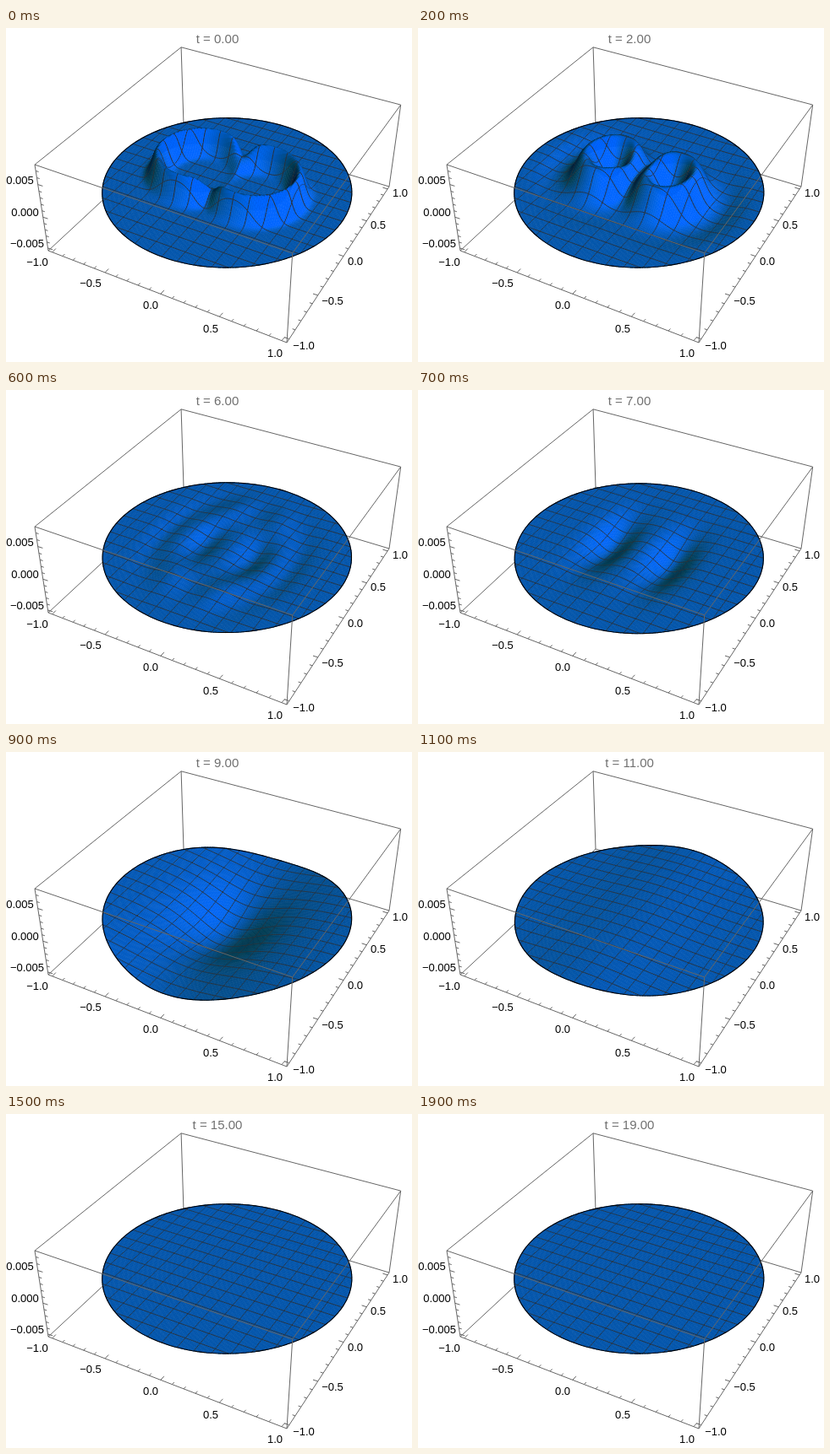
An HTML page with a canvas for the animation above (2 s loop, 480 px wide and 396 px high).

```html
<!DOCTYPE html>
<html lang="en">
<head>
<meta charset="utf-8">
<title>Wave on a disk</title>
<style>
  html, body { margin: 0; width: 100%; height: 100%; overflow: hidden; background: #fff; }
  svg, canvas { position: absolute; left: 0; top: 0; width: 480px; height: 396px; }
  text { font: 13px "Liberation Sans", Arial, sans-serif; text-anchor: middle; }
  #title { font-size: 15px; fill: #707070; }
  path { fill: none; stroke: #666; stroke-width: 1; }
</style>
</head>
<body>
<svg viewBox="0 0 480 396"><path id="back"/></svg>
<canvas id="surface" width="480" height="396"></canvas>
<svg viewBox="0 0 480 396">
  <path id="front"/>
  <path id="ticks"/>
  <g id="labels"></g>
  <text id="title" x="250" y="18"></text>
</svg>
<script>
const $ = id => document.getElementById(id);
const ctx = $('surface').getContext('2d');
const STEPS = 20, STEP_MS = 100;
const N = 128, MESH = 8, H = 2 / N;
const PAD = 1.04, Z0 = 0.407, ZC = 75, STEEP = 62.4;

// Perspective view of the box; a, b, c run from 0 to 1 along its edges.
function project(a, b, c) {
  const w = 1 - 0.1097 * a + 0.2152 * b - 0.072 * c;
  return [
    (50 + 245.58 * a + 205.19 * b - 18.45 * c) / w,
    (264 + 68.08 * a - 124.25 * b - 113.66 * c) / w
  ];
}
const unit = v => 0.5 + v / (2 * PAD);
const place = (x, y, z) => project(unit(x), unit(y), Z0 + ZC * z);

const bell = (v, s) => Math.exp(-v * v / (s * s));

// Two joined rings that close in on their centres.
function rings(x, y, t) {
  const ax = Math.hypot(x, 0.02 + 0.02 * t);
  const s = Math.hypot(ax - 0.25 - 0.01 * t, y * (1 - 0.1 * t));
  const r = 0.345 * (1 - t / 4.6);
  const waist = 1 - 0.5 * bell(x, 0.08);
  return 0.0038 * waist * bell(s - r, 0.065 + 0.015 * t)
    - 0.0003 * t * bell(s - r - 0.26, 0.12) * bell(y, 0.6);
}

// Two facing crescents, each with a trough on its outer side.
function crescents(x, y) {
  const q = Math.hypot(x, 0.6 * y);
  const side = 1 - bell(x, 0.2);
  return side * (0.0036 * bell(q - 0.32, 0.13) - 0.0015 * bell(q - 0.56, 0.1) * bell(y, 0.6));
}

const twinTroughs = (x, y) => -0.0006
  - 0.0019 * (bell(x - 0.27, 0.15) + bell(x + 0.27, 0.15)) * bell(y, 0.38);

const valley = (x, y) => -0.0029 * bell(x, 0.33) * bell(y, 0.5) - 0.0019 * bell(x, 0.65);

// Shapes after the rings, blended from one to the next.
const stages = [
  [3, (x, y) => rings(x, y, 3)],
  [4, crescents],
  [7, twinTroughs],
  [9, valley],
  [11, x => -0.0009 + 0.0007 * bell(x, 0.5)],
  [14.5, () => 0]
];

function shapeAt(t) {
  if (t < stages[0][0]) return (x, y) => rings(x, y, t);
  const i = stages.findIndex(s => t < s[0]);
  if (i < 0) return () => 0;
  const [t0, f] = stages[i - 1], [t1, g] = stages[i];
  const k = (t - t0) / (t1 - t0), m = k * k * (3 - 2 * k);
  return (x, y) => (1 - m) * f(x, y) + m * g(x, y);
}

// Colour from the slope, lit from the viewer's right.
function shade(gx, gy) {
  const len = Math.hypot(gx, gy, 1);
  const nx = -gx / len, ny = -gy / len, nz = 1 / len;
  const right = 0.879 * nx + 0.476 * ny;
  const up = -0.281 * nx + 0.519 * ny + 0.807 * nz;
  const toward = 0.384 * nx - 0.709 * ny + 0.591 * nz;
  const d = 0.5 * right - 0.1 * up + 0.86 * toward;
  const g = Math.min(102, 62 + (d > 0 ? 53 : 80) * d);
  const b = Math.min(255, 85 + (d > 0 ? 200 : 70) * d);
  return `rgb(0,${Math.round(g)},${Math.round(b)})`;
}

function drawSurface(t) {
  const u = shapeAt(t), grid = [];
  for (let j = 0; j <= N; j++) {
    const row = [];
    for (let i = 0; i <= N; i++) {
      const x = i * H - 1, y = j * H - 1, r = Math.hypot(x, y);
      const z = u(x, y), out = r > 1;
      row.push({ z, out, p: out ? place(x / r, y / r, u(x / r, y / r)) : place(x, y, z) });
    }
    grid.push(row);
  }

  ctx.clearRect(0, 0, 480, 396);
  ctx.lineJoin = 'round';
  const edge = (a, b) => {
    if (a.out && b.out) return;
    ctx.beginPath();
    ctx.moveTo(...a.p);
    ctx.lineTo(...b.p);
    ctx.strokeStyle = '#2c3138';
    ctx.lineWidth = 1;
    ctx.stroke();
  };

  // Far cells first.
  const k = STEEP / (2 * H);
  for (let j = N - 1; j >= 0; j--) {
    for (let i = 0; i < N; i++) {
      const a = grid[j][i], b = grid[j][i + 1], c = grid[j + 1][i + 1], d = grid[j + 1][i];
      if (a.out && b.out && c.out && d.out) continue;
      ctx.beginPath();
      for (const v of [a, b, c, d]) ctx.lineTo(...v.p);
      ctx.closePath();
      ctx.fillStyle = ctx.strokeStyle = shade((b.z + c.z - a.z - d.z) * k, (c.z + d.z - a.z - b.z) * k);
      ctx.lineWidth = 0.6;
      ctx.fill();
      ctx.stroke();
      if ((j + 1) % MESH === 0) edge(d, c);
      if (i % MESH === 0) edge(a, d);
    }
  }

  ctx.beginPath();
  for (let i = 0; i < 180; i++) {
    const x = Math.cos(i * Math.PI / 90), y = Math.sin(i * Math.PI / 90);
    ctx.lineTo(...place(x, y, u(x, y)));
  }
  ctx.closePath();
  ctx.strokeStyle = '#000';
  ctx.lineWidth = 1.1;
  ctx.stroke();
}

function drawBox() {
  const line = (...pts) => 'M' + pts.map(p => project(...p).map(v => v.toFixed(1))).join('L');
  $('back').setAttribute('d',
    line([0, 0, 0], [0, 1, 0], [1, 1, 0]) + line([0, 1, 0], [0, 1, 1]));
  $('front').setAttribute('d',
    line([0, 0, 1], [0, 1, 1], [1, 1, 1], [1, 0, 1], [0, 0, 1], [0, 0, 0], [1, 0, 0], [1, 1, 0], [1, 1, 1])
    + line([1, 0, 0], [1, 0, 1]));

  let d = '';
  const tick = ([x, y], dx, dy, major) => {
    const l = major ? 6 : 3.5;
    d += `M${x.toFixed(1)} ${y.toFixed(1)}l${(dx * l).toFixed(1)} ${(dy * l).toFixed(1)}`;
  };
  for (let i = -10; i <= 10; i++) {
    tick(project(unit(i / 10), 0, 0), 0.68, -0.73, i % 5 === 0);
    tick(project(1, unit(i / 10), 0), -0.95, -0.3, i % 5 === 0);
  }
  for (let i = -5; i <= 7; i++) tick(project(0, 0, Z0 + ZC * i / 1000), 0.95, 0.3, i % 5 === 0);
  $('ticks').setAttribute('d', d);
}

function drawLabels() {
  const add = (value, digits, x, y) => {
    const el = document.createElementNS($('labels').namespaceURI, 'text');
    el.textContent = value.toFixed(digits).replace('-', '\u2212');
    el.setAttribute('x', x);
    el.setAttribute('y', y + 4.5);
    $('labels').append(el);
  };
  [[37, 277], [100, 302], [171, 328], [242, 356], [318, 385]]
    .forEach((p, i) => add(i / 2 - 1, 1, ...p));
  [[352, 376.5], [386, 323], [413, 276], [440, 233], [466, 195]]
    .forEach((p, i) => add(i / 2 - 1, 1, ...p));
  [[25, 255.5], [22.5, 218.5], [16.5, 180]]
    .forEach((p, i) => add((i - 1) * 0.005, 3, ...p));
}

let shown = -1;
const start = performance.now();
function tickFrame() {
  const t = Math.floor((performance.now() - start) / STEP_MS) % STEPS;
  if (t !== shown) {
    shown = t;
    drawSurface(t);
    $('title').textContent = 't = ' + t.toFixed(2);
  }
  requestAnimationFrame(tickFrame);
}

drawBox();
drawLabels();
tickFrame();
</script>
</body>
</html>
```
